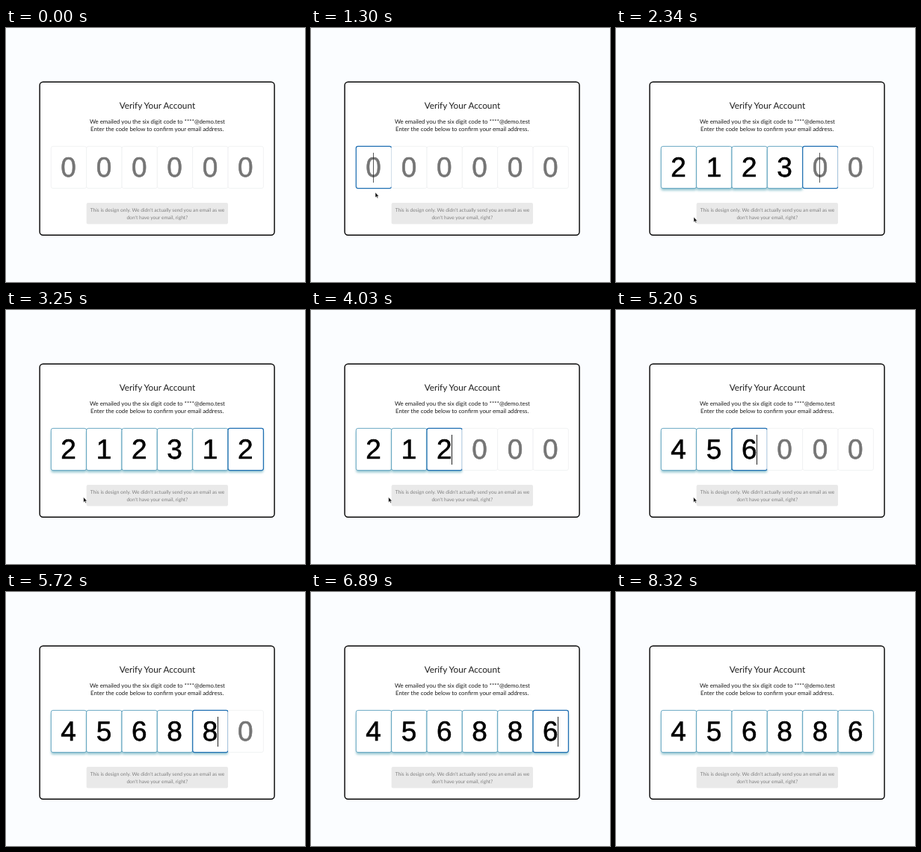
These frames come from a looping animation (400 by 340 pixels, 8450 ms). An HTML page:

```html
<!DOCTYPE html>
<html lang="en">
<head>
<meta charset="utf-8">
<title>Verify Your Account</title>
<style>
  html, body { margin: 0; width: 100%; height: 100%; overflow: hidden; background: #fbfdff; }
  svg { display: block; width: 400px; height: 340px; text-rendering: geometricPrecision; }
  text { font-family: Lato, "Open Sans", sans-serif; text-anchor: middle; fill: #1c1c1c; }
  .title { font-size: 11.75px; }
  .lead { font-size: 7.85px; }
  .note { font-size: 6.65px; fill: #808080; }
  .box { fill: #fff; }
  .edge { fill: none; stroke: #f0f1f2; stroke-width: .9; }
  .digit { font: 37px "Liberation Sans", Arial, sans-serif; fill: #757575; stroke: #757575; stroke-width: .6; }
  .filled .box { filter: drop-shadow(0 3px 1.8px rgba(50, 145, 165, .5)); }
  .filled .edge { stroke: #5b9fbd; }
  .filled .digit { fill: #000; stroke: #000; }
  .focus .edge { stroke: #1f6fb2; stroke-width: 1.25; }
  .caret { fill: #222; }
</style>
</head>
<body>
<svg viewBox="0 0 400 340">
  <rect x="45.1" y="72.3" width="314" height="204.9" rx="4.5" fill="#fff" stroke="#080808" stroke-width="1.45"/>
  <text class="title" x="202.4" y="108.2">Verify Your Account</text>
  <text class="lead" x="202.4" y="128.2">We emailed you the six digit code to ****@demo.test</text>
  <text class="lead" x="202.2" y="137.5">Enter the code below to confirm your email address.</text>
  <g id="boxes"></g>
  <rect x="107.7" y="234" width="189.3" height="28.4" rx="2" fill="#e9e9e9"/>
  <text class="note" x="202.5" y="246">This is design only. We didn't actually send you an email as we</text>
  <text class="note" x="202.3" y="255.5">don't have your email, right?</text>
  <rect id="caret" class="caret" y="167" width="1" height="40"/>
  <path id="arrow" d="M0 0V7L1.6 5.6L2.7 8L3.8 7.5L2.8 5.2H4.8Z" fill="#111" stroke="#fff" stroke-width=".5"/>
  <path id="beam" d="M-1.2 0H1.2M0 0V8M-1.2 8H1.2" fill="none" stroke="#444" stroke-width=".7"/>
</svg>
<script>
  const LOOP = 8450, BLINK = 520, COUNT = 6;
  const LEFT = 60.3, PITCH = 47.35, TOP = 158.4, HEIGHT = 56.2, HALF_DIGIT = 10.3;

  // [time, typed digits, focused box or -1]
  const entries = [
    [0, '', -1], [910, '', 0],
    [1950, '2', 1], [2080, '21', 2], [2210, '212', 3], [2340, '2123', 4],
    [2470, '21231', 5], [2600, '212312', 5],
    [3510, '21231', 5], [3640, '21231', 4], [3770, '2123', 4], [3900, '2123', 3],
    [4030, '212', 2], [4160, '21', 1], [4290, '2', 0], [4420, '', 0],
    [4940, '45', 2], [5200, '456', 2], [5330, '456', 3], [5460, '4568', 3],
    [5720, '45688', 4], [5850, '456886', 5], [7930, '456886', -1]
  ];

  // [time, x, y]; no position means hidden
  const pointer = [
    [0], [130, 175, 274], [260, 150, 252], [390, 119, 224], [520, 92, 202], [650, 75, 188],
    [1300, 86, 220], [1430, 97, 240], [1560, 104, 253], [2990, 104, 252], [3250, 103.7, 250.5],
    [5720], [7670, 103, 258], [7800, 97, 286], [7930, 91, 311], [8060]
  ];

  const byId = id => document.getElementById(id);
  const show = (el, on) => el.setAttribute('visibility', on ? 'visible' : 'hidden');
  const latest = (list, t) => list.findLast(item => item[0] <= t);
  const center = i => LEFT + PITCH * (i + 0.5) - 0.4;

  function make(tag, parent, attrs) {
    const el = document.createElementNS('http://www.w3.org/2000/svg', tag);
    for (const key in attrs) el.setAttribute(key, attrs[key]);
    return parent.appendChild(el);
  }

  const cells = Array.from({ length: COUNT }, (_, i) => {
    const group = make('g', byId('boxes'), {});
    const frame = { x: LEFT + PITCH * i, y: TOP, width: PITCH, height: HEIGHT, rx: 2.5 };
    make('rect', group, { ...frame, class: 'box' });
    make('rect', group, { ...frame, class: 'edge' });
    const digit = make('text', group, { class: 'digit', x: center(i), y: 199.1 });
    return { group, digit };
  });

  function drawEntry(t) {
    const [since, code, focus] = latest(entries, t);
    cells.forEach(({ group, digit }, i) => {
      const state = (i < code.length ? 'filled ' : '') + (i === focus ? 'focus' : '');
      const value = code[i] || '0';
      if (group.getAttribute('class') !== state) group.setAttribute('class', state);
      if (digit.textContent !== value) digit.textContent = value;
    });
    const offset = focus < code.length ? HALF_DIGIT : 0;
    const caret = byId('caret');
    caret.setAttribute('x', Math.round(center(focus) + offset - 0.5));
    caret.setAttribute('opacity', offset ? 1 : 0.75);
    show(caret, focus >= 0 && Math.floor((t - since) / BLINK) % 2 === 0);
  }

  function drawPointer(t) {
    const [, x, y] = latest(pointer, t);
    const visible = x !== undefined;
    const overBox = y < TOP + HEIGHT;
    for (const [id, on] of [['arrow', !overBox], ['beam', overBox]]) {
      const el = byId(id);
      show(el, visible && on);
      if (visible) el.setAttribute('transform', `translate(${x} ${y})`);
    }
  }

  function draw() {
    const t = performance.now() % LOOP;
    drawEntry(t);
    drawPointer(t);
    requestAnimationFrame(draw);
  }
  draw();
</script>
</body>
</html>
```
